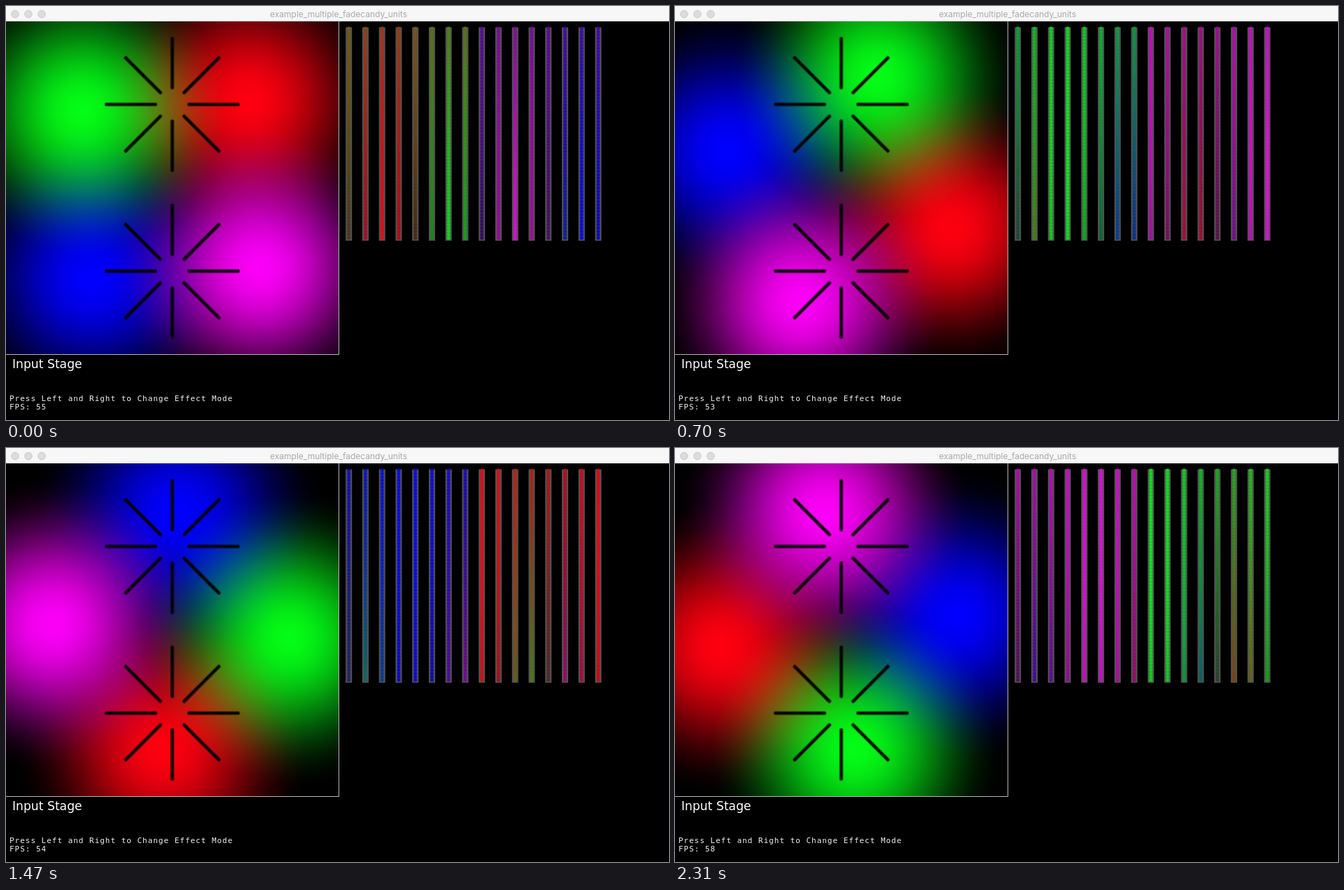
These frames come from a looping animation (947 by 591 pixels, 2380 ms). An HTML page with a canvas:

```html
<!DOCTYPE html>
<html lang="en">
<head>
<meta charset="utf-8">
<title>LED strips</title>
<style>
  html, body { margin: 0; width: 100%; height: 100%; overflow: hidden; background: #000; }
  canvas, svg { position: absolute; left: 0; top: 0; display: block; }
  .title { font: 12px Inter, Roboto, sans-serif; fill: #a9a9a9; text-anchor: middle; }
  .label { font: 17.2px "DejaVu Sans", sans-serif; fill: #fff; }
  .mono { font: 11px "DejaVu Sans Mono", monospace; letter-spacing: .98px; fill: #f2f2f2; white-space: pre; }
</style>
</head>
<body>
<canvas id="stage" width="947" height="591"></canvas>
<svg width="947" height="591" viewBox="0 0 947 591">
  <rect width="947" height="21.5" fill="#f7f7f7"/>
  <rect y="21" width="947" height="1" fill="#d8d8d8"/>
  <g fill="#dcdcdc" stroke="#cbcbcb">
    <circle cx="13" cy="11.5" r="5.3"/>
    <circle cx="32" cy="11.5" r="5.3"/>
    <circle cx="51" cy="11.5" r="5.3"/>
  </g>
  <text class="title" x="475" y="16">example_multiple_fadecandy_units</text>
  <path d="M0 497.5H475.5V22" fill="none" stroke="#b4b4b4"/>
  <text class="label" x="9" y="517">Input Stage</text>
  <text class="mono" x="5" y="564">Press Left and Right to Change Effect Mode</text>
  <text class="mono" x="5" y="576" id="fps">FPS: 55</text>
</svg>
<script>
const LOOP = 2380, STEP = 70;
const TIMES = [0, 420, 700, 1050, 1330, 1680, 2310];
const ANGLES = [41.5, 86, 109, 143.5, 169, 205, 262.5];
const RATES = [55, 52, 53, 54, 54, 55, 58];

const ORBIT = { x: 235, y: 262, r: 169 };
const GLOW = 218;
// magenta, blue, green, red, a quarter turn apart
const COLORS = [[251, 0, 246], [0, 0, 254], [4, 252, 22], [254, 0, 15]];

const STARS = [{ x: 237.5, y: 140.5 }, { x: 237.5, y: 378.5 }];
const INNER = 24, OUTER = 94, LEDS = 64;

const ctx = document.getElementById('stage').getContext('2d');
const fps = document.getElementById('fps');
const rad = deg => deg * Math.PI / 180;
const falloff = d => d >= GLOW ? 0 : (1 + Math.cos(Math.PI * d / GLOW)) / 2;
const rgb = (c, k = 1) => `rgb(${c.map(v => Math.round(v * k)).join()})`;

function track(values, t) {
  let i = 0;
  while (i < TIMES.length - 2 && t >= TIMES[i + 1]) i++;
  const k = Math.min(1, (t - TIMES[i]) / (TIMES[i + 1] - TIMES[i]));
  return values[i] + (values[i + 1] - values[i]) * k;
}

function blobsAt(t) {
  const base = track(ANGLES, t);
  return COLORS.map((color, i) => {
    const a = rad(base + 90 * i);
    return { color, x: ORBIT.x + ORBIT.r * Math.cos(a), y: ORBIT.y + ORBIT.r * Math.sin(a) };
  });
}

// screen blend of all blobs at one point
function sample(blobs, x, y) {
  const dark = [1, 1, 1];
  for (const b of blobs) {
    const k = falloff(Math.hypot(x - b.x, y - b.y));
    b.color.forEach((v, i) => dark[i] *= 1 - k * v / 255);
  }
  return dark.map(v => 255 * (1 - v));
}

function drawBlobs(blobs) {
  ctx.save();
  ctx.beginPath();
  ctx.rect(0, 22, 475, 475);
  ctx.clip();
  ctx.globalCompositeOperation = 'screen';
  for (const b of blobs) {
    const g = ctx.createRadialGradient(b.x, b.y, 0, b.x, b.y, GLOW);
    for (let i = 0; i <= 24; i++) g.addColorStop(i / 24, rgb(b.color, falloff(GLOW * i / 24)));
    ctx.fillStyle = g;
    ctx.fillRect(0, 22, 475, 475);
  }
  ctx.restore();
}

// spokes run from straight down, counter-clockwise
function eachSpoke(fn) {
  STARS.forEach((s, j) => {
    for (let k = 0; k < 8; k++) {
      const a = rad(90 - 45 * k), c = Math.cos(a), n = Math.sin(a);
      fn(j * 8 + k, r => [s.x + c * r, s.y + n * r]);
    }
  });
}

function drawSpokes() {
  ctx.beginPath();
  eachSpoke((i, at) => {
    ctx.moveTo(...at(INNER));
    ctx.lineTo(...at(OUTER));
  });
  ctx.lineCap = 'round';
  for (const [w, alpha] of [[6, .45], [3.6, .9]]) {
    ctx.lineWidth = w;
    ctx.strokeStyle = `rgba(0,0,0,${alpha})`;
    ctx.stroke();
  }
}

function drawStrips(blobs) {
  eachSpoke((i, at) => {
    const x = 489.7 + 23.75 * i;
    ctx.fillStyle = '#545454';
    ctx.fillRect(x - 4.5, 30.5, 9, 304.5);
    for (let n = 0; n < LEDS; n++) {
      const y = 32 + 4.75 * n;
      const r = INNER + (OUTER - INNER) * n / (LEDS - 1);
      ctx.fillStyle = rgb(sample(blobs, ...at(r)));
      ctx.globalAlpha = .3;
      ctx.fillRect(x - 3, y - 2.4, 6, 4.75);
      ctx.globalAlpha = .8;
      ctx.beginPath();
      ctx.arc(x, y, 2.4, 0, 2 * Math.PI);
      ctx.fill();
    }
    ctx.globalAlpha = 1;
  });
}

function draw(t) {
  const blobs = blobsAt(t);
  ctx.fillStyle = '#000';
  ctx.fillRect(0, 0, 947, 591);
  drawBlobs(blobs);
  drawSpokes();
  drawStrips(blobs);
  fps.textContent = 'FPS: ' + Math.round(track(RATES, t));
}

let start = null, shown = -1;
function tick(now) {
  if (start === null) start = now;
  const t = Math.floor(((now - start) % LOOP) / STEP) * STEP;
  if (t !== shown) draw(shown = t);
  requestAnimationFrame(tick);
}
draw(0);
requestAnimationFrame(tick);
</script>
</body>
</html>
```
